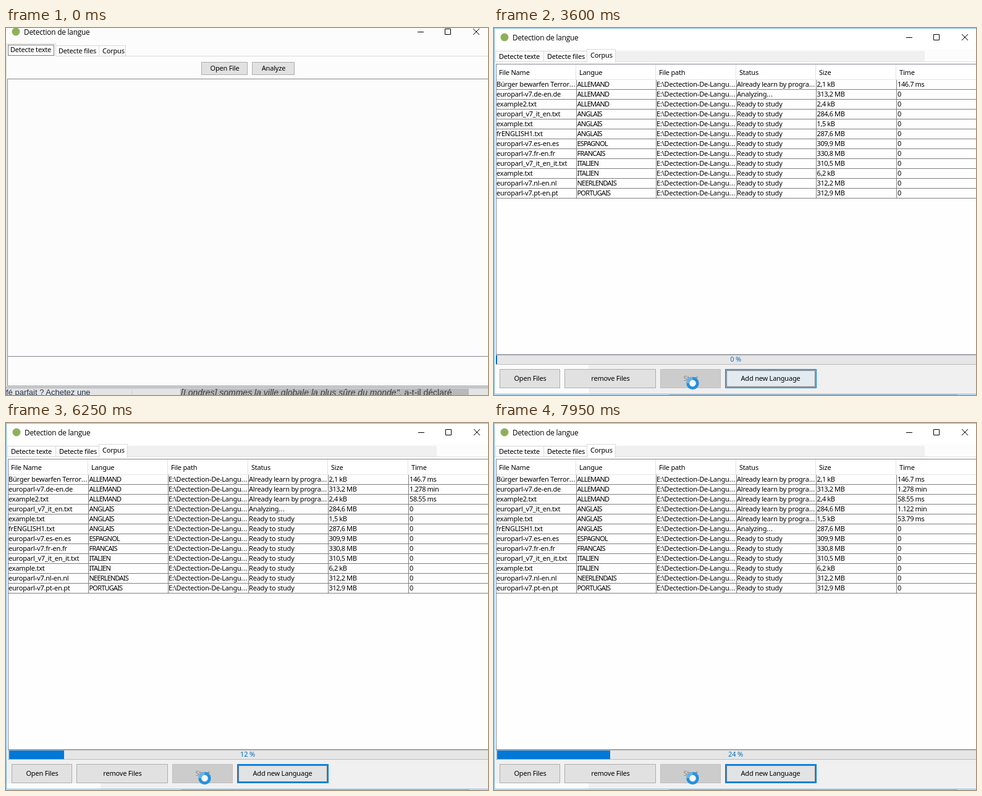
Animation of 780x594 px, one loop 8000 ms. Source, as an HTML page:

```html
<!DOCTYPE html>
<html lang="fr">
<head>
<meta charset="utf-8">
<title>Detection de langue</title>
<style>
html, body { margin: 0; width: 100%; height: 100%; overflow: hidden; background: #fcfcfc; }
svg { display: block; width: 780px; height: 594px; }
text { font: 11px "Noto Sans", "Open Sans", sans-serif; letter-spacing: -0.2px; white-space: pre; }
.title { font: 11.8px "Open Sans", "Noto Sans", sans-serif; }
.caps { letter-spacing: -0.8px; }
.num { letter-spacing: -0.4px; }
.dots { letter-spacing: 0.4px; }
.page { font: 13px "Liberation Sans", Arial, sans-serif; letter-spacing: 0; }
.mid { text-anchor: middle; }
</style>
</head>
<body>
<svg id="stage" viewBox="0 0 780 594" xmlns="http://www.w3.org/2000/svg"></svg>
<script>
const LOOP = 8000, STEP = 50;
const START = 650, REPAINT = 800, FIRST_DONE = 4550, SECOND_DONE = 7900;

const rect = (x, y, w, h, fill, extra = "") =>
  `<rect x="${x}" y="${y}" width="${w}" height="${h}" fill="${fill}" ${extra}/>`;
const frame = (x, y, w, h, fill, stroke, extra = "") =>
  rect(x + .5, y + .5, w - 1, h - 1, fill, `stroke="${stroke}" ${extra}`);
const text = (x, y, s, cls = "", extra = "") =>
  `<text x="${x}" y="${y}" class="${cls}" ${extra}>${s}</text>`;
const cut = s => s + '<tspan class="dots">...</tspan>';
const hline = (x, y, w, c) => rect(x, y, w, 1, c);
const vline = (x, y, h, c) => rect(x, y, 1, h, c);
const dotted = (x, y, w, h) => frame(x, y, w, h, "none", "#000", 'stroke-dasharray="1 1"');
const button = (x, y, w, h, label, id = "") =>
  frame(x, y, w, h, "#e1e1e1", "#adadad", id && `id="${id}"`) +
  text(x + w / 2 + .5, y + h / 2 + 3.5, label, "mid", id && `id="${id}Label"`);

// Title bar, shared by both views
const titleBar = (dx, dy) => `<g transform="translate(${dx} ${dy})">
  <circle cx="17" cy="15" r="6.5" fill="#8fb05a"/>
  ${text(30, 20, "Detection de langue", "title")}
  <path d="M667 15.5h10M711.5 10.5h9v9h-9zM757 10l10 10M767 10l-10 10" fill="none" stroke="#000"/>
</g>`;

function textView() {
  return rect(0, 0, 780, 594, "#fcfcfc") + titleBar(-1, -9) +
    hline(0, 45, 780, "#d9d9d9") + vline(0, 25, 556, "#d9d9d9") +
    frame(80, 28, 71, 18, "#fcfcfc", "#d9d9d9") +
    frame(150, 28, 44, 18, "#fcfcfc", "#d9d9d9") +
    frame(0, 25, 81, 21, "#fcfcfc", "#d9d9d9") + rect(1, 45, 79, 1, "#fcfcfc") +
    dotted(3, 27, 75, 18) +
    text(7, 39, "Detecte texte") + text(85, 41, "Detecte files") + text(156, 41, "Corpus") +
    button(316, 55, 75, 21, "Open File") + button(398, 55, 69, 21, "Analyze") +
    frame(2, 82, 790, 450, "#fcfcfc", "#828790") +
    frame(2, 531, 790, 49, "#fcfcfc", "#828790") +
    rect(0, 581, 780, 13, "#e4e4e4") + rect(0, 581, 780, 1, "#a8a8a8") +
    rect(0, 582, 780, 2, "#cfcfcf") +
    vline(203, 584, 10, "#d2d2d2") + rect(282, 584, 467, 10, "#b9b9b9") +
    text(0, 594, "fé parfait ? Achetez une", "page", 'fill="#26344f"') +
    `<text x="283" y="595" class="page" style="font-size:14px" fill="#3c3c3c"><tspan font-style="italic">[Londres] sommes la ville globale la plus sûre du monde"</tspan>, a-t-il déclaré</text>`;
}

const cols = [4, 133, 262, 392, 521, 651];
const heads = ["File Name", "Langue", "File path", "Status", "Size", "Time"];
const files = [
  [cut("Bürger bewarfen Terror"), "ALLEMAND", "2,1 kB", "146.7 ms"],
  ["europarl-v7.de-en.de", "ALLEMAND", "313,2 MB", "1.278 min"],
  ["example2.txt", "ALLEMAND", "2,4 kB", "58.55 ms"],
  ["europarl_v7_it_en.txt", "ANGLAIS", "284,6 MB", "1.122 min"],
  ["example.txt", "ANGLAIS", "1,5 kB", "53.79 ms"],
  ["frENGLISH1.txt", "ANGLAIS", "287,6 MB"],
  ["europarl-v7.es-en.es", "ESPAGNOL", "309,9 MB"],
  ["europarl-v7.fr-en.fr", "FRANCAIS", "330,8 MB"],
  ["europarl_v7_it_en_it.txt", "ITALIEN", "310,5 MB"],
  ["example.txt", "ITALIEN", "6,2 kB"],
  ["europarl-v7.nl-en.nl", "NEERLENDAIS", "312,2 MB"],
  ["europarl-v7.pt-en.pt", "PORTUGAIS", "312,9 MB"]
];

function table() {
  let s = frame(3, 58, 790, 471, "#fefefe", "#828790") + rect(4, 59, 776, 24, "#fff") +
    hline(4, 83, 776, "#e5e5e5");
  heads.forEach((h, i) => {
    s += text(cols[i] + (i ? 5 : 4), 76, h);
    if (i) s += vline(cols[i] - 1, 59, 24, "#e2e2e2") + vline(cols[i], 84, 192, "#808080");
  });
  files.forEach(([name, lang, size], i) => {
    const y = 95 + 16 * i;
    s += hline(4, y + 4, 776, "#808080") +
      text(4, y, name) + text(134.5, y, lang, "caps") +
      text(263, y, cut("E:\\Dectection-De-Langu")) +
      text(393, y, "", "", `id="status${i}"`) +
      text(522.5, y, size, "num") + text(653, y, "0", "num", `id="time${i}"`);
  });
  return s;
}

function corpusView() {
  return rect(0, 0, 780, 594, "#fcfcfc") + rect(1, 1, 779, 33, "#fff") +
    hline(0, 0, 780, "#79b7e7") + vline(0, 0, 593, "#79b7e7") + titleBar(0, 0) +
    rect(197, 37, 500, 17, "#f0f0f0", 'id="strip"') +
    hline(1, 54, 779, "#e2e2e2") +
    frame(2, 37, 79, 18, "#fcfcfc", "#d9d9d9") +
    frame(80, 37, 71, 18, "#fcfcfc", "#d9d9d9") +
    frame(150, 34, 47, 22, "#fff", "#d9d9d9") + rect(151, 54, 45, 3, "#fff") +
    text(8, 50, "Detecte texte") + text(86, 50, "Detecte files") + text(156, 48, "Corpus") +
    table() +
    frame(3, 529, 790, 16, "#e6e6e6", "#bcbcbc") +
    rect(3, 530, 2, 14, "#0068b8", 'id="sliver"') + rect(5, 530, 0, 14, "#0078d7", 'id="bar"') +
    text(391, 540, "0 %", "mid", 'id="percent" fill="#0070c0"') +
    rect(1, 545, 779, 47, "#f0f0f0") + rect(1, 583, 152, 9, "#fcfcfc") +
    rect(1, 545, 152, 47, "#fcfcfc", 'id="pale"') +
    button(9, 552, 98, 31, "Open Files") + button(114, 552, 148, 31, "remove Files") +
    button(269, 552, 98, 31, "Start", "start") +
    frame(374, 552, 148, 31, "#e1e1e1", "#0078d7") +
    frame(375, 553, 146, 29, "#e1e1e1", "#0078d7", 'id="pulse"') +
    dotted(376, 554, 144, 27) + text(447.5, 571, "Add new Language", "mid") +
    `<g id="busy"><circle cx="321.5" cy="575" r="7.8" fill="#f4f8fb" stroke="#2490df" stroke-width="4.8"/>
      <path d="M313.7 575a7.8 7.8 0 0 1 7.8-7.8" fill="none" stroke="#62b5ee" stroke-width="4.8"/></g>` +
    hline(0, 592, 780, "#79b7e7") + rect(0, 593, 780, 1, "#ededed") +
    rect(283, 593, 467, 1, "#bdbdbd") +
    text(1, 603, "Nouvelle flambée", "page", 'fill="#333"');
}

const stage = document.getElementById("stage");
stage.innerHTML = `<g id="textTab">${textView()}</g><g id="corpusTab">${corpusView()}</g>`;
const el = id => document.getElementById(id);
const show = (id, on) => el(id).setAttribute("display", on ? "inline" : "none");
const mix = (a, b, p) => `rgb(${a.map((v, i) => Math.round(v + (b[i] - v) * p))})`;

// The glow is sampled twice per period, so it alternates; at times it rests halfway.
function glow(t) {
  const still = [[700, 800], [1850, 1950], [2450, 2550], [2750, 3600]];
  if (still.some(([a, b]) => t >= a && t < b)) return .35;
  return t / STEP % 2 ? .1 : .6;
}

function draw(time) {
  const t = Math.floor(time % LOOP / STEP) * STEP;
  show("textTab", t < STEP);
  show("corpusTab", t >= STEP);

  const running = t >= START;
  const done = !running ? 0 : t < FIRST_DONE ? 1 : t < SECOND_DONE ? 3 : 5;
  files.forEach((f, i) => {
    el("status" + i).innerHTML = i < done ? cut("Already learn by progra")
      : running && i === done ? cut("Analyzing") : "Ready to study";
    el("time" + i).textContent = i < done ? f[3] : "0";
  });

  el("bar").setAttribute("width", [0, 0, 0, 89, 0, 183][done]);
  el("percent").textContent = Math.max(0, done - 1) * 6 + " %";
  show("sliver", done < 2);
  show("pale", done < 2);
  show("busy", running);
  show("strip", t >= REPAINT);
  el("start").setAttribute("fill", running ? "#cccccc" : "#e1e1e1");
  el("start").setAttribute("stroke", running ? "#bfbfbf" : "#adadad");
  el("startLabel").setAttribute("fill", running ? "#838383" : "#000");

  const p = glow(t), light = [229, 241, 251];
  el("pulse").setAttribute("fill", mix([225, 225, 225], light, p));
  el("pulse").setAttribute("stroke", mix([0, 120, 215], light, p));
}

const origin = performance.now();
function tick() {
  draw(performance.now() - origin);
  requestAnimationFrame(tick);
}
tick();
</script>
</body>
</html>
```
